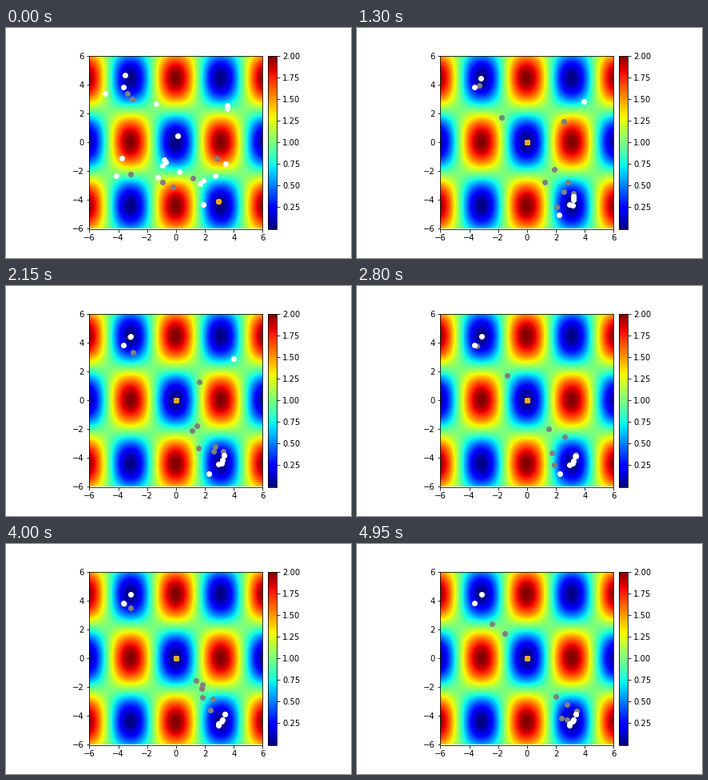
These frames come from a looping animation (432 px wide and 288 px high, 5 s). A matplotlib script:

```python
import numpy as np
import matplotlib.pyplot as plt
from matplotlib.animation import FuncAnimation

W, H, DPI = 432, 288, 72
FRAMES, INTERVAL = 100, 50
LEFT, BOTTOM, SIDE = 104.4, 36.5, 217

rng = np.random.default_rng(4)


def griewank(x, y):
    return 1 + (x**2 + y**2) / 4000 - np.cos(x) * np.cos(y / np.sqrt(2))


class Roamer:
    """Creeps into a side valley and swings between it and the middle."""

    def __init__(self, start, home, late, leave=FRAMES, goal=(0, 0)):
        self.start, self.home, self.goal = map(np.array, (start, home, goal))
        self.leave = leave
        self.phase = 1.2 if late else 0
        self.rate = rng.uniform(0.5, 0.9)
        self.turn = rng.uniform(-0.12, 0.12)

    def best(self, n):
        if n >= self.leave:
            return self.goal
        held = n // 4 * 4
        return self.home + (self.start - self.home) / (1 + 0.25 * held)

    def position(self, n):
        x, y = self.best(n)
        angle = self.rate * n + self.phase
        along = 0.7 + 0.3 * np.cos(angle)
        across = self.turn * np.sin(angle)
        return np.array([x * along - y * across, y * along + x * across])


class Settler:
    """Swings quickly to rest in the middle."""

    def __init__(self, start, drift=(0, 0)):
        self.start = np.array(start)
        self.drift = np.array(drift)
        self.rate = rng.uniform(0.9, 1.3)

    def best(self, n):
        return self.start * 0.42 ** (n // 2)

    def position(self, n):
        return (self.start + self.drift) * 0.7**n * np.cos(self.rate * n)


upper, lower, side = (-3.12, 4.4), (3.19, -4.4), (3.46, -3.93)
low, edge = (2.96, -4.62), (2.3, -5.17)

leader = Settler((0.14, 0.47))
first_top = (2.91, -4.07)

swarm = [
    Roamer((-3.56, 4.67), upper, late=True),
    Roamer((-3.62, 3.79), (-3.62, 3.79), late=True),
    Roamer((3.57, 2.52), (4.02, 2.9), late=False, leave=55),
    Roamer((3.57, 2.35), (4.18, 2.74), late=False, leave=18),
    Roamer((-4.12, -2.3), (-4.12, -2.3), late=True, leave=18),
    Roamer((1.91, -4.29), edge, late=False, leave=75, goal=low),
    Roamer(first_top, lower, late=False),
    Roamer((2.69, -2.35), low, late=False),
    Roamer((1.69, -2.9), side, late=True),
    Roamer((1.86, -2.68), side, late=False),
    Roamer((3.41, -1.52), lower, late=True),
    Settler((-4.89, 3.35)),
    Settler((-1.35, 2.63)),
    Settler((-3.78, -1.13)),
    Settler((-0.8, -1.19)),
    Settler((-0.74, -1.41)),
    Settler((-0.91, -1.58), drift=(0, -1.16)),
    Settler((-1.29, -2.46), drift=(1.1, -0.66)),
    Settler((0.2, -2.07)),
    leader,
]

fig = plt.figure(figsize=(W / DPI, H / DPI), dpi=DPI, facecolor="white")
ax = fig.add_axes([LEFT / W, BOTTOM / H, SIDE / W, SIDE / H])
bar_ax = fig.add_axes([328.1 / W, BOTTOM / H, 10.9 / W, SIDE / H])

axis = np.linspace(-6, 6, 200)
surface = ax.imshow(griewank(*np.meshgrid(axis, axis)), cmap="jet",
                    extent=(-6, 6, -6, 6), origin="lower",
                    interpolation="bilinear", aspect="auto")
fig.colorbar(surface, cax=bar_ax)
ax.set(xlim=(-6, 6), ylim=(-6, 6),
       xticks=range(-6, 7, 2), yticks=range(-6, 7, 2))


def dots(color, order):
    return ax.plot([], [], "o", color=color, ms=6, zorder=order)[0]


current = dots("gray", 2)
bests = dots("white", 3)
top = dots("orange", 4)


def draw(n):
    current.set_data(*np.transpose([p.position(n) for p in swarm]))
    bests.set_data(*np.transpose([p.best(n) for p in swarm]))
    x, y = leader.best(n) if n else first_top
    top.set_data([x], [y])
    return current, bests, top


anim = FuncAnimation(fig, draw, frames=FRAMES, interval=INTERVAL,
                     repeat=True, repeat_delay=0)
plt.show()
```
